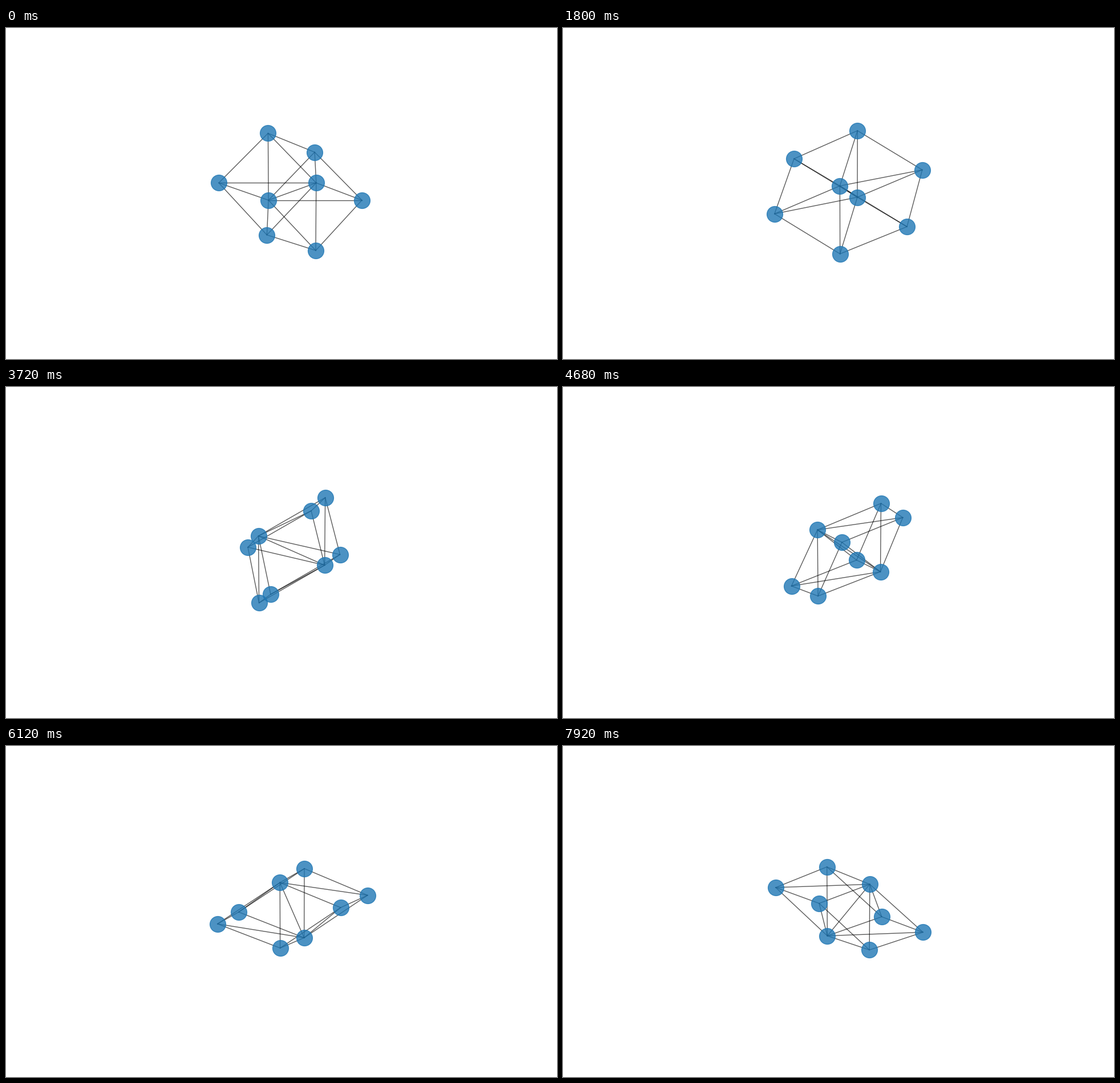
Recreate the animation shown at these times as a matplotlib script. Size 966 by 580 pixels, loop 8000 ms.

```python
from itertools import combinations

import matplotlib.pyplot as plt
import numpy as np
from matplotlib.animation import FuncAnimation

DPI = 100
TICK = 40            # ms per drawn frame
HOLD = 3             # drawn frames per rotation step
STEP = 4             # degrees per rotation step
FRAMES = 8000 // TICK
LIMIT = 3.3 * 25 / 24

# A sheared cube: two hubs and two opposite triples around them.
hub = np.ones(3)
triple = np.ones((3, 3)) - 4 * np.eye(3)
nodes = np.vstack([hub, -hub, triple, -triple])


def linked(i, j):
    """Hubs join everything; the triples join crosswise, except opposites."""
    if i < 2:
        return True
    return i < 5 <= j and j - i != 3


fig = plt.figure(figsize=(9.66, 5.8), dpi=DPI, facecolor="white")
ax = fig.add_subplot(projection="3d")
ax.set_axis_off()

for i, j in combinations(range(len(nodes)), 2):
    if linked(i, j):
        ax.plot(*nodes[[i, j]].T, color="black", lw=1, alpha=0.65)
ax.scatter(*nodes.T, s=400, color="tab:blue", alpha=0.8, depthshade=False)

span = (-LIMIT, LIMIT)
ax.set(xlim=span, ylim=span, zlim=span)


def update(frame):
    ax.view_init(elev=20, azim=STEP * (frame // HOLD))
    return []


anim = FuncAnimation(fig, update, frames=FRAMES, interval=TICK,
                     init_func=lambda: update(0), repeat=True, repeat_delay=0)
plt.show()
```
